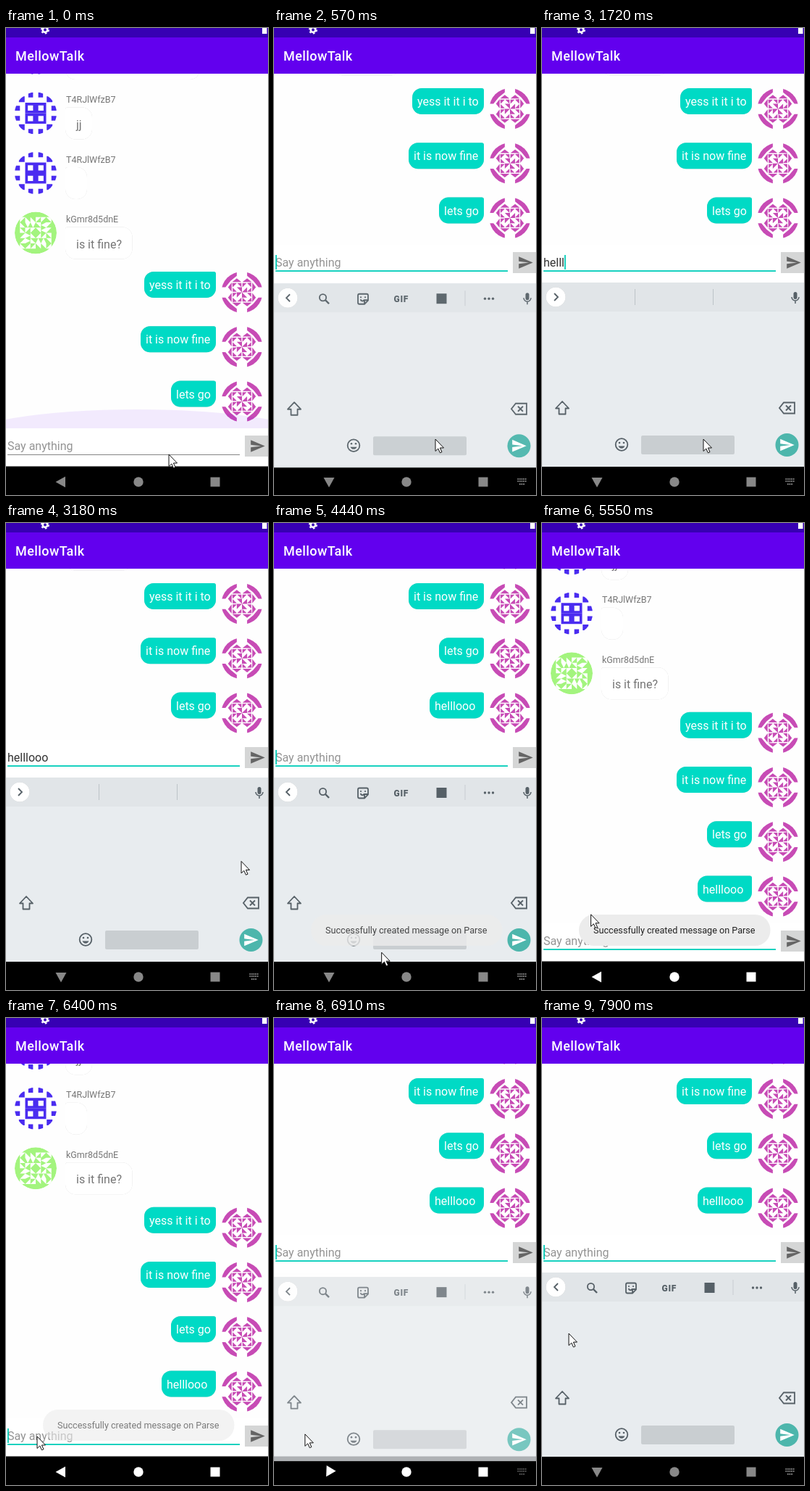
Animation of 362 by 644 pixels, one loop 8 s. Source, as an HTML page:

```html
<!DOCTYPE html>
<html lang="en">
<head>
<meta charset="utf-8">
<title>MellowTalk</title>
<style>
  html, body { margin: 0; width: 100%; height: 100%; overflow: hidden; background: #fff; }
  svg { display: block; }
  text { font-family: Roboto, sans-serif; font-size: 16px; white-space: pre; }
  .bubble { filter: drop-shadow(0 .6px .7px #0003); }
  .line { fill: none; stroke: #566067; stroke-width: 1.8; }
</style>
</head>
<body>
<svg id="stage" width="362" height="644" viewBox="0 0 362 644"></svg>
<script>
const LOOP = 8000, KEYBOARD = 253, ROW = 75.25;
const OPEN1 = 400, CLOSE = 5010, OPEN2 = 6800, CLEAR = 3960, SENT = 4270;
const WORD = 'helllooo ';
const KEYS = [1110, 1250, 1400, 1530, 1650, 1780, 1900, 2130, 2250];
const BLINKS = [130, 480, ...KEYS, CLEAR, OPEN2];
const MOUSE = [
  [0, 225, 588], [120, 225, 588], [250, 223, 567], [3170, 223, 567],
  [3180, 325, 467], [3450, 343, 322], [4170, 343, 322], [4440, 149, 592],
  [4650, 77, 622], [5300, 77, 622], [5700, 62, 491], [6200, 48, 560],
  [6400, 43, 577], [6900, 43, 577], [7400, 37, 435], [LOOP, 37, 435]
];

const rect = (x, y, w, h, fill, more = '') =>
  `<rect x="${x}" y="${y}" width="${w}" height="${h}" fill="${fill}" ${more}/>`;
const circle = (x, y, r, fill, more = '') =>
  `<circle cx="${x}" cy="${y}" r="${r}" fill="${fill}" ${more}/>`;
const text = (x, y, s, fill, more = '') =>
  `<text x="${x}" y="${y}" fill="${fill}" ${more}>${s}</text>`;
const path = (d, more = '') => `<path d="${d}" ${more}/>`;

// Rounded box with a separate radius per corner, clockwise from top left
const box = (x, y, w, h, [a, b, c, d], fill) => path(
  `M${x + a} ${y}h${w - a - b}a${b} ${b} 0 0 1 ${b} ${b}v${h - b - c}a${c} ${c} 0 0 1 ${-c} ${c}` +
  `h${c + d - w}a${d} ${d} 0 0 1 ${-d} ${-d}v${a + d - h}a${a} ${a} 0 0 1 ${a} ${-a}z`,
  `fill="${fill}" class="bubble"`);

// Each avatar is one quadrant turned four times, clipped to a disc
const AVATARS = {
  violet: ['#4a2cf0', '#fff',
    'M-1-1H0V0H-1ZM-.75-.75V-.25H-.25V-.75ZM-.7-2H-.25V-1.5H-.7ZM.25-2H.7V-1.5H.25ZM-1.6-1.6H-1.05V-1.05H-1.6Z'],
  green: ['#fff', '#a3f47e',
    'M-1-1.5L-.5-1H-1ZM-.5-1.5L0-1H-.5ZM-1.5-1L-1-.5H-1.5ZM-1.5-.5L-1 0H-1.5ZM-1-1H-.5L-.75-.5ZM-.5-1H0L-.25-.5ZM-1-.5H-.5L-1 0ZM-.5-.5H0L-.5 0ZM-1.5-1.5H-1L-1.5-1Z'],
  pink: ['#c74bb5', '#fff',
    'M-2-2H-.5V-1.6L-1.1-1.1L-1.6-.5H-2ZM-.95-1L-.5-1.35L-.05-1ZM-1-.95L-1.35-.5L-1-.05ZM-.95-.9H-.5L-.9-.5ZM-.45-.9H-.05V-.5ZM-.9-.45L-.5-.05H-.9ZM-.5-.5H0V0Z']
};
const avatar = (x, y, r, kind) => {
  const [ink, paper, d] = AVATARS[kind];
  const turns = [0, 90, 180, 270].map(a => path(d, `transform="rotate(${a})"`)).join('');
  return `<g transform="translate(${x} ${y}) scale(${r / 2})" clip-path="url(#disc)" fill="${ink}" fill-rule="evenodd">` +
    circle(0, 0, 2, paper) + turns + '</g>';
};

const received = (y, name, msg, w, kind) =>
  avatar(41, y, 29, kind) +
  text(83, y - 14.5, name, '#777', 'style="font-size:12.5px"') +
  box(82, y - 8, w, 44, [3, 14, 14, 14], '#fff') +
  text(97, y + 21, msg, '#757575');
const sent = (i, x, msg) => {
  const y = 336 + i * ROW;
  return box(x, y, 290 - x, 36, [13, 3, 13, 13], '#00dac5') +
    text(x + 7, y + 24, msg, '#fff') + avatar(326, y + 28.5, 28.5, 'pink');
};

const plane = (x, y, k, fill) => path('M-10 9L11 0L-10-9V-2L5 0L-10 2Z',
  `transform="translate(${x} ${y}) scale(${k})" fill="${fill}"`);
const INK = '#566067';

const tools =
  path('M22 366l-5 5 5 5', 'class="line"') +
  circle(67.5, 370.5, 4.6, 'none', 'class="line"') + path('M71 374l5 5', 'class="line" style="stroke-width:2.4"') +
  path('M118 365.500h10q2 0 2 2v7l-5 5h-7q-2 0-2-2v-10q0-2 2-2zM130 374h-5v5M119.500 373q2 4 5 1', 'class="line"') +
  circle(120, 370, 1.1, INK) + circle(126, 370, 1.1, INK) +
  text(165.5, 376.5, 'GIF', INK, 'style="font-size:12px;font-weight:900;letter-spacing:.7px"') +
  rect(224.5, 365, 14, 14, INK) +
  rect(263.5, 361, 1, 21, '#c8ced2') +
  [291.5, 297, 302.5].map(x => circle(x, 372, 1.7, INK)).join('');
const suggestions = path('M17 366l5 5-5 5', 'class="line"') +
  rect(128, 360, 1, 22, '#bcc3c7') + rect(236, 360, 1, 22, '#bcc3c7');

const keyboard =
  rect(0, 351, 362, 254, '#e8ecef') + rect(0, 351, 362, 40, '#e1e5e8') +
  circle(19, 371, 13.5, '#fff', 'class="bubble"') +
  `<g id="tools">${tools}</g><g id="suggestions">${suggestions}</g>` +
  rect(347.5, 364, 5, 10, INK, 'rx="2.5"') + path('M345 371a5 5 0 0 0 10 0M350 376v4', 'class="line" style="stroke-width:1.5"') +
  path('M28 515l9 9.500h-4.500v8h-9v-8h-4.500z', 'class="line" stroke-linejoin="round"') +
  path('M334 516.500h15v15h-15l-6-7.500zM337 520.500l7 7m0-7l-7 7', 'class="line"') +
  circle(110, 574.5, 8.3, 'none', 'class="line"') + circle(107, 572, 1.3, INK) + circle(113, 572, 1.3, INK) +
  path('M105.500 576.500a4.800 4.800 0 0 0 9 0z', `fill="${INK}"`) +
  rect(137, 562, 129, 26, '#c9ced1', 'rx="2"') +
  circle(338.5, 575, 16, '#4db6ac') + plane(338.5, 575, .93, '#fff');

stage.innerHTML = `
<defs>
  <clipPath id="disc"><circle r="2"/></clipPath>
  <clipPath id="view"><rect id="viewBox" y="63" width="362" height="489"/></clipPath>
</defs>
${rect(0, 0, 362, 644, '#fefefe')}
<g clip-path="url(#view)"><g id="list">
  ${received(35, 'T4RJlWfzB7', '', 186, 'violet')}
  ${received(117.5, 'T4RJlWfzB7', 'jj', 37, 'violet')}
  ${received(200, 'T4RJlWfzB7', '', 30, 'violet')}
  ${received(282.5, 'kGmr8d5dnE', 'is it fine?', 92.5, 'green')}
  ${sent(0, 191, 'yess it it i to')}${sent(1, 186, 'it is now fine')}
  ${sent(2, 228, 'lets go')}${sent(3, 215, WORD)}
</g><ellipse id="glow" cx="181" cy="566" rx="240" ry="40" fill="#6200ee" fill-opacity=".08"/></g>
<g class="bubble">${rect(0, 13, 362, 50, '#6200ee')}</g>
${rect(0, 0, 362, 13, '#3700b3')}
${circle(54, 2.5, 3.3, 'none', 'stroke="#fff" stroke-width="2.6"')}
${circle(54, 2.5, 5.2, 'none', 'stroke="#fff" stroke-width="1.6" stroke-dasharray="2.7"')}
${rect(354, 0, 6.5, 8, '#fff')}
${text(13, 45, 'MellowTalk', '#fff', 'style="font-size:18px;font-weight:500;letter-spacing:.4px"')}
<g id="input">
  ${rect(0, 552, 362, 53, '#fff')}
  ${text(2, 581.5, '', '#333', 'id="field"')}
  <rect id="rule" x="2" width="321"/>
  ${rect(2, 566, 1.8, 20, '#00cdb9', 'id="caret"')}
  ${rect(330, 562, 32, 29, '#d5d6d6', 'id="send"')}${plane(347.5, 576.5, .93, '#656565')}
</g>
${rect(0, 604.5, 362, 39.5, '#000')}
<g id="keyboard">${keyboard}</g>
${rect(31, 606, 91, 38, '#fff', 'id="press" rx="19"')}
<g id="nav">
  ${path('M-7.500 0L6-7.500V7.500Z', 'id="back"')}
  ${circle(183, 626, 6.7, 'inherit')}
  ${path('M282.500 619.500h13v13h-13z')}
  <g id="switcher">${path('M336.500 622h13M336.500 625h13M339 629h8', 'fill="none" stroke="#888" stroke-width="1.800" stroke-dasharray="1.600 1"')}</g>
</g>
<g id="toast">${rect(51, 540, 264.5, 43, '#ececec', 'rx="21"')}
  ${text(71, 566, 'Successfully created message on Parse', '#222', 'style="font-size:12.64px"')}</g>
<g id="mouse">${path('M0 0V16.500L3.800 13L6.400 18.800L9 17.700L6.400 12H11.500Z', 'fill="#fff" stroke="#111"')}</g>`;

const $ = id => document.getElementById(id);
const set = (id, attrs) => { for (const k in attrs) $(id).setAttribute(k, attrs[k]); };
const ramp = (t, a, b) => Math.min(1, Math.max(0, (t - a) / (b - a)));
const easeOut = x => 1 - (1 - x) ** 2;

function mouseAt(t) {
  const i = MOUSE.findIndex(p => p[0] > t);
  const [a, ax, ay] = MOUSE[i - 1], [b, bx, by] = MOUSE[i], k = ramp(t, a, b);
  return `translate(${ax + (bx - ax) * k} ${ay + (by - ay) * k})`;
}

function draw(t) {
  const open = t >= OPEN1 && t < CLOSE || t >= OPEN2;
  const lift = open ? KEYBOARD : 0;
  set('list', { transform: `translate(0 ${-lift - ROW * easeOut(ramp(t, SENT, 4390))})` });
  set('viewBox', { height: 489 - lift });
  set('glow', { opacity: 1 - ramp(t, 100, 400) });
  set('input', { transform: `translate(0 ${-lift})` });

  // Text field
  const focus = t >= 130;
  const typed = t < CLEAR ? WORD.slice(0, KEYS.filter(k => k <= t).length) : '';
  $('field').textContent = typed || 'Say anything';
  set('field', { fill: typed ? '#333' : '#949494' });
  set('rule', focus ? { y: 587.2, height: 1.8, fill: '#00cdb9' } : { y: 588, height: 1, fill: '#858585' });
  const since = t - Math.max(...BLINKS.filter(b => b <= t));
  set('caret', {
    x: 2 + (typed ? $('field').getComputedTextLength() : 0),
    opacity: focus && since % 1000 < 500 ? 1 : 0
  });
  set('send', { fill: t > 3650 && t < 3950 ? '#c4c5c5' : '#d5d6d6' });

  // Keyboard slides a little while fading
  const start = t < CLOSE ? OPEN1 : OPEN2;
  const closing = ramp(t, CLOSE, 5210);
  const shown = open ? easeOut(ramp(t, start, start + 220)) : t >= CLOSE ? 1 - closing ** 3 : 0;
  const drop = open ? 25 * (1 - shown) : 18 * closing;
  set('keyboard', { transform: `translate(0 ${drop})`, opacity: shown });
  const swap = ramp(t, 1110, 1390) - ramp(t, CLEAR, 4160);
  set('tools', { opacity: Math.max(0, 1 - 2 * swap) });
  set('suggestions', { opacity: Math.max(0, 2 * swap - 1) });

  // Navigation bar
  const turn = open ? ramp(t, start, start + 170) : t >= CLOSE ? 1 - ramp(t, CLOSE, 5300) : 0;
  const bright = ramp(t, 4850, 5250) - ramp(t, 7720, 7890);
  const grey = Math.round(136 + 119 * bright);
  set('nav', { fill: `rgb(${grey},${grey},${grey})` });
  set('back', { transform: `translate(76 626) rotate(${-90 * turn})` });
  set('switcher', { opacity: open ? turn : 0 });
  set('press', { opacity: .16 * (ramp(t, 4850, 4970) - ramp(t, 5100, 5500)) });

  set('toast', { opacity: ramp(t, 4270, 4480) - ramp(t, 6280, 6580) });
  set('mouse', { transform: mouseAt(t) });
}

const begin = performance.now();
function tick() {
  draw((performance.now() - begin) % LOOP);
  requestAnimationFrame(tick);
}
tick();
</script>
</body>
</html>
```
